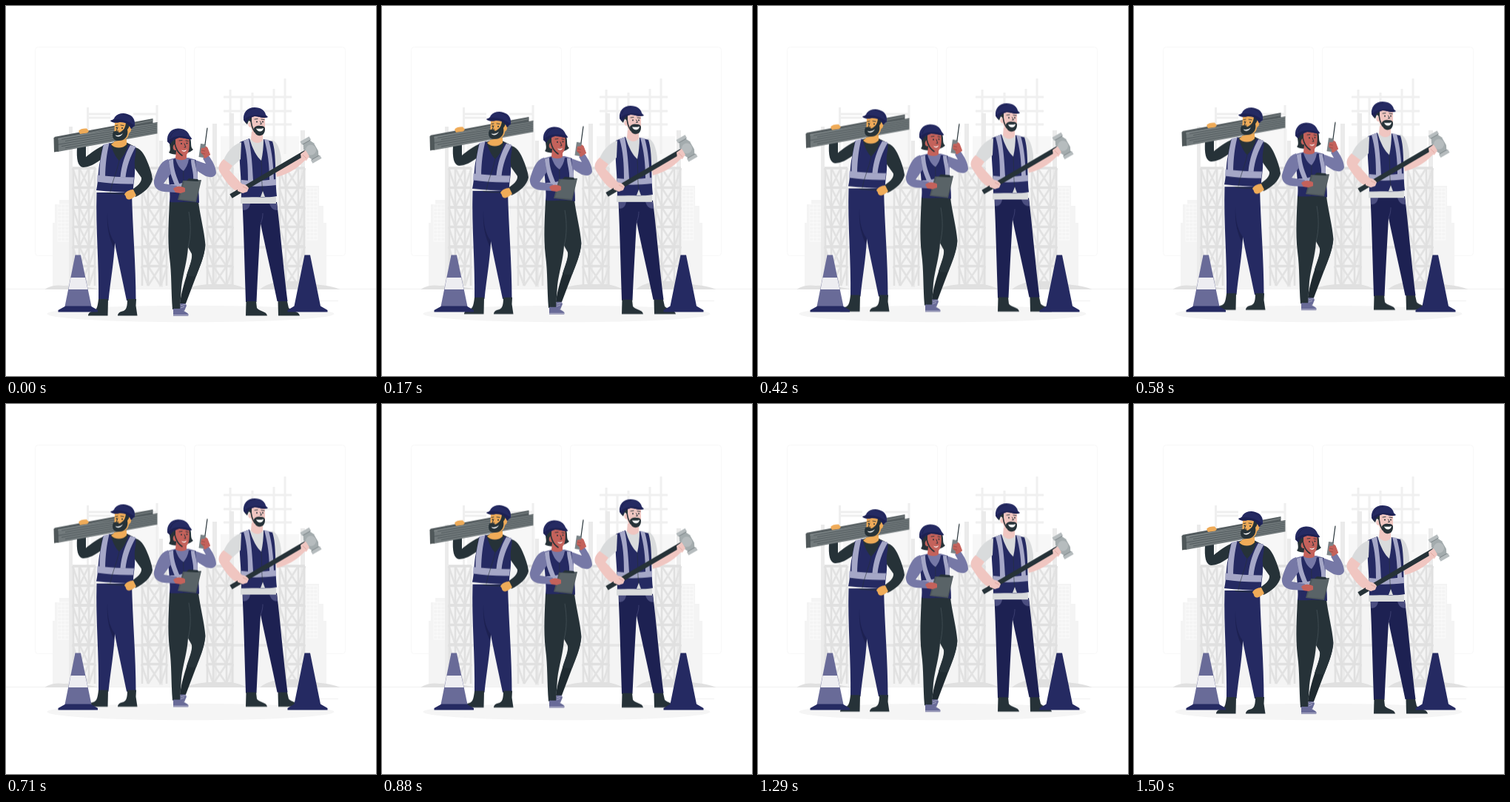
Animation, 500 px wide and 500 px high, one loop 1540 ms. Source, as an HTML page:

```html
<!DOCTYPE html>
<html lang="en">
<head>
<meta charset="utf-8">
<title>Construction crew</title>
<style>
  html, body { margin: 0; width: 100%; height: 100%; overflow: hidden; background: #fff; }
  svg { display: block; width: 100vw; height: 100vh; }
  .navy { fill: #252a62; }
  .deep { fill: #1d2152; }
  .dark { fill: #263238; }
  .tape { fill: #a5a7c7; }
  .mauve { fill: #7678a6; }
  .shoe { fill: #696b98; }
  .tan { fill: #efab58; }
  .brown { fill: #c4625b; }
  .pink { fill: #f0c6c1; }
  .cloth { fill: #d9dbdc; }
  .line { fill: none; stroke: #263238; stroke-linecap: round; stroke-linejoin: round; }
</style>
</head>
<body>
<svg viewBox="0 0 500 500" xmlns="http://www.w3.org/2000/svg">
  <g fill="none" stroke="#f8f8f8">
    <rect x="39.500" y="55.500" width="203" height="282" rx="4"/>
    <rect x="254.500" y="55.500" width="204" height="282" rx="4"/>
  </g>
  <g id="site"></g>
  <path d="M0 382.500H500M417 398.500h32" stroke="#ebebeb" stroke-width=".7"/>
  <g fill="#e0e0e0">
    <path d="M52 383C60 378 69 376.500 78 378C92 377 108 378 126 383Z"/>
    <path d="M240 383C256 377 272 375 288 376C304 374 315 378 326 383Z"/>
    <path d="M343 383C356 372 378 370 398 373C416 377 434 376 452 383Z"/>
  </g>
  <ellipse cx="249.500" cy="416" rx="194" ry="11.300" fill="#f5f5f5"/>

  <g id="crew">
    <!-- carpenter -->
    <g>
      <path class="dark" d="M96 191L108 188V204C114 199 123 192 135 187L131 205C121 214 111 218 104 218C97 217 95 207 96 191Z"/>
      <path class="navy" d="M122.500 252H170C171 300 175.500 350 175.500 398H163C157 368 151 342 147 320C146 346 141 372 138.500 398H125C126 350 121 300 122.500 252Z"/>
      <path class="deep" d="M137 280C137 297 140 310 147 320L146 328C139 313 136 299 137 280Z"/>
      <path class="dark" d="M125 396H138L137.500 418.500H111C111 415 114 413 119 412C123 410 124 405 125 396Z"/>
      <path class="dark" d="M164 396H176L175.500 405L177.500 418.500H151C151 415 154 413 159 412C163 410 164 405 164 396Z"/>
      <path class="dark" d="M168 190C179 190 185 196 190 208C194 217 197 226 198 234C196 244 186 253 175 258L169 249C177 244 184 238 183 232L173 218Z"/>
      <path class="dark" d="M131 189L146 184H162L174 190V215H130Z"/>
      <path class="tan" d="M146 175H163V187C158 193 147 193 142 187L146 184Z"/>
      <path class="navy" d="M131 188L141 185C144 196 149 206 153 209C158 204 163 197 165 187L175 190C177 197 173 205 174 216C175 232 171 243 172 253C155 251 139 251 122 249C125 236 124 222 127 210Z"/>
      <path class="tape" d="M132 187L139.500 185.500C136 200 134.500 213 134 231L126.500 230C126 212 129 199 132 187Z"/>
      <path class="tape" d="M168 188L175.500 190C168 203 163 217 161.500 232L154.500 231C156 215 161 200 168 188Z"/>
      <path class="tape" d="M123.500 228.500C140 230.500 156 231.500 173 231.500L172 240.500C155 241 139 239.500 123 237.500Z"/>
      <path class="line" d="M153 209C150 224 143 238 141 251" stroke-width=".6"/>
      <path class="line" d="M137 252.500C148 254 156 254 163 254" stroke-width="1"/>
      <path class="tan" d="M160 255C161 251 167 248 172 248L176 256C172 259 169 262 165 261.500C161 260 163 257 160 255Z"/>
      <path d="M65 177L198.500 152V160L70 182Z" fill="#555d60"/>
      <path d="M70 178L204.500 157.500V172.500L70 197Z" fill="#727a7c"/>
      <path d="M64.500 178L70 177L71 196.500L65 197.500Z" fill="#50585a"/>
      <path id="grain" fill="none" stroke="#4b5457" stroke-width=".8"/>
      <path d="M70 180L199 154.500" stroke="#8b9294" stroke-width=".8"/>
      <path class="tan" d="M98 169C100 166 105 165 109 165.500L112 169L110 171.500L100 173Z"/>
      <path class="tan" d="M147 155H165V163C170 161 171 169 166 172C165 182 154 184 148 180C145 175 147 166 147 155Z"/>
      <path class="dark" d="M162 156H167L166 164L164 167C166 176 160 183 151 182C144 182 143 175 145 170C148 168 151 169 153 171C158 169 162 165 162 156Z"/>
      <path d="M147.500 174.500C151 175.500 155 174.500 158 172C156 176.500 150 178 147.500 174.500Z" fill="#fff"/>
      <path class="line" d="M148 161.500l3-.5M155 161l4 .5M151 164l-2 5h3" stroke-width=".9"/>
      <circle class="dark" cx="149.500" cy="164.500" r="1"/><circle class="dark" cx="157" cy="165" r="1"/>
      <path class="navy" d="M141 155C144 154 146 153 147 150C151 145 158 144 164 146C171 148 175 153 174 162L169 166C167 160 162 157 154 157C149 158 144 158 141 155Z"/>
      <path class="deep" d="M141 155C152 151 163 154 173 161L169 166C166 159 160 156 153 157C148 158 144 158 141 155Z"/>
      <path d="M158 146C165 147 170 151 172 157" fill="none" stroke="#1d2152"/>
    </g>

    <!-- foreman -->
    <g>
      <path class="dark" d="M221 181C220 188 224 194 220 198C226 203 246 201 253 194C248 190 252 184 248 177Z"/>
      <path class="shoe" d="M236 400L242 400L244 405L241 412L234 411Z"/>
      <path d="M244 318L269 322C269 336 262 352 257 365L243 402L235 402C237 385 243 368 246 358C249 349 252 342 252 335Z" fill="#1f2a30"/>
      <path class="dark" d="M221 264H260C262 282 268 304 269.500 323C268 340 261 354 257 365C251 366 248 365 244 364C248 352 252 342 251 335L246 326C245 345 239 362 237 380L235 410H225C223 385 224 362 221 340C218 314 220 288 221 264Z"/>
      <path d="M247 278C250 295 250 311 246 326" fill="none" stroke="#455157" stroke-width=".8"/>
      <path class="shoe" d="M226 409H237C239 413 245 413 247 417.500L246 418.800H226Z"/>
      <path d="M226 417.500H247" stroke="#d5d6e3" stroke-width=".6"/>
      <path d="M236 405l7-2M236 408l5-2" stroke="#d5d6e3" stroke-width=".6"/>
      <path class="mauve" d="M218 208L229 205H247L257 208L259 222L258 263H222Z"/>
      <path class="brown" d="M230 195H244V206C240 209 234 209 229 206Z"/>
      <path class="mauve" d="M251 207C260 209 266 212 270 213L266 206L273 201C279 209 284 218 284 226C282 232 276 232 270 230C264 227 259 223 255 220Z"/>
      <path class="navy" d="M219 210L229 206C231 214 235 220 240 223C243 219 246 214 247 207L256 208C257 226 261 244 261 266C247 263 235 266 221 265C224 244 217 224 219 210Z"/>
      <path class="tape" d="M220 209L226 207C226 221 231 232 235 242L229 244C224 232 220 222 220 209Z"/>
      <path class="tape" d="M250 207.500L255 208C256 217 259 225 259 235H253C254 225 250 217 250 207.500Z"/>
      <path class="tape" d="M222 241C234 242 247 236 260 234V240C247 243 234 248 223 247Z"/>
      <path class="line" d="M240 223C239 235 242 250 240 264" stroke-width=".6"/>
      <path class="mauve" d="M219 207C208 210 204 222 200 236C199 245 205 250 214 251L229 252L231 243L213 240L223 226Z"/>
      <path d="M239 236L264 235L257 265L232 262Z" fill="#4d575b"/>
      <path d="M241 237L263 237L256 263L234 261Z" fill="#596367"/>
      <path class="dark" d="M244 236L247 233L259 234L260 237Z"/>
      <path class="brown" d="M226 247C230 243 236 243 242 246L242 251L236 253L229 252Z"/>
      <path class="brown" d="M262 194C265 187 271 188 273 193L276 201L269 206L262 202Z"/>
      <path d="M263 186L270 187L267 205L260.500 204Z" fill="#7a8387"/>
      <path class="line" d="M269 187L272 165" stroke-width="1.200"/>
      <path class="brown" d="M264 192L272 191L276 201L270 205L263 198Z"/>
      <path d="M264 195l5 1M264 199l5 1" stroke="#8d4b46" stroke-width=".7"/>
      <path class="brown" d="M229 177H247C248 184 249 196 244 201C239 204 232 200 230 195C225 196 224 188 229 186Z"/>
      <path class="line" d="M227 178C228 188 230 197 238 202" stroke-width="1.600"/>
      <path d="M237 194.500C240 196 242 195.500 244 194C243 197.500 239 197.500 237 194.500Z" fill="#fff"/>
      <path class="line" d="M234 182l4-.5M243 182l3 .5M241 186l2 5h-2" stroke-width=".9"/>
      <circle class="dark" cx="237" cy="186" r="1"/><circle class="dark" cx="244.500" cy="185.500" r="1"/>
      <path class="navy" d="M218 183C217 173 223 166 232 165.500C240 165 246 169 248 175C249 177 251 178 251 180C246 181 241 178 234 178C228 180 223 183 222 187Z"/>
      <path class="deep" d="M218 183C224 176 237 173 251 179C246 181 241 178 234 178C228 179 224 182 222 187Z"/>
      <path d="M222 178C224 171 228 168 234 167" fill="none" stroke="#1d2152"/>
    </g>

    <!-- demolition worker -->
    <g>
      <path class="pink" d="M364 219C373 220 387 209 398 200L408 204C397 217 385 226 366 231Z"/>
      <path class="cloth" d="M359 181C367 183 370 193 372 207L372 218L363 222Z"/>
      <path class="deep" d="M319.500 265H366C371 307 374 345 380.500 399H366.500C359 362 351 328 344 294C342 330 340 365 338.500 400H324C322.500 354 321.500 310 319.500 265Z"/>
      <path d="M347 280C347 287 345 292 344 294" fill="none" stroke="#4b4e80" stroke-width=".7"/>
      <path d="M320 267H330C329 273 326 276 320.500 276ZM356 267H366L367 276C361 276 358 273 356 267Z" fill="#4b4e80"/>
      <path class="dark" d="M324.500 399H338L339 408C342 413 352 412 353 418.500H324Z"/>
      <path class="dark" d="M367.500 399H380L382 408C386 413 396 412 397 418.500H368Z"/>
      <path class="cloth" d="M317 185L331 180H348L361 183L365 267H317Z"/>
      <path class="pink" d="M332 170H347V181C343 187 335 186 331 180Z"/>
      <path class="navy" d="M316 184L329 179C333 193 339 204 345 209C347 200 348 190 348 180L360 183C366 201 363 229 366 257C349 260 334 257 318 259C319 235 314 210 316 184Z"/>
      <path class="tape" d="M321 182L328 179.500C332 200 333 217 334 236L327 236C327 216 326 199 321 182Z"/>
      <path class="tape" d="M349 180L355 181C360 199 361 215 362 235H356C356 215 354 198 349 180Z"/>
      <path class="tape" d="M318 235C333 237 349 236 365 234V242C349 244 334 244 318 243Z"/>
      <path class="line" d="M345 209C346 228 345 243 348 257" stroke-width=".6"/>
      <path d="M344 258L347 250L350 258Z" fill="#d9dbdc"/>
      <path class="cloth" d="M318 258.500C334 260 349 259 365 258.500V267H317Z"/>
      <path class="cloth" d="M318 184C305 188 298 199 294 208L306 217L317 207Z"/>
      <path class="pink" d="M294 207C288 213 285 219 290 226C296 236 304 247 314 252L322 244L302 222L306 216Z"/>
      <path d="M304 257L408 196" stroke="#263238" stroke-width="6.500"/>
      <g transform="translate(412 194.500) rotate(-30)" fill="#a3abad">
        <path d="M-5 -12H5L8 -6V6L5 12H-5L-8 6V-6Z"/>
        <path d="M-7 -17H7V-12H-7ZM-7 12H7V17H-7Z" fill="#b6bcbe"/>
        <path d="M-6 -12H6M-6 12H6" stroke="#7b8487"/>
        <circle r="7" fill="#b6bcbe"/>
      </g>
      <path class="pink" d="M313 242C318 239 325 241 328 246L326 251L320 253L313 250Z"/>
      <path class="pink" d="M398 200L405 195L410 203L406 209L399 207Z"/>
      <path d="M320 244l6 3M401 201l5 5" stroke="#d79c96" stroke-width=".7"/>
      <path class="pink" d="M331 148H350V167C349 175 340 177 334 172L331 164C326 164 326 156 331 156Z"/>
      <path class="dark" d="M322 148L332 150V157L328 155L326 160C322 157 320 153 322 148Z"/>
      <path class="line" d="M331 152C331 160 332 164 336 170" stroke-width="1.600"/>
      <path class="dark" d="M335 165C338 161 341 161.500 344 162C347 161.500 350 163 350 166C350 173 346 176 341 175C337 174 335 170 335 165Z"/>
      <path d="M338 165.500C341 166 345 166 348 165C347 171 340 171 338 165.500Z" fill="#fff"/>
      <path class="line" d="M336 153l4-.5M345 153l4 .5M343.500 156l2 3.500h-2" stroke-width=".9"/>
      <circle class="dark" cx="339" cy="156.500" r="1"/><circle class="dark" cx="347" cy="156.500" r="1"/>
      <path class="navy" d="M321 154C320 144 326 137 336 137C344 137 350 141 351 147L354 150C348 153 342 149 336 149C331 150 327 153 325 158Z"/>
      <path class="deep" d="M321 154C328 147 341 145 354 150C348 153 342 149 336 149C331 150 327 153 325 158Z"/>
      <path d="M324 148C326 142 330 139 337 139" fill="none" stroke="#1d2152"/>
    </g>
  </g>

  <!-- cones -->
  <path d="M93.500 336.500H101L115.500 406H79.500Z" fill="#696b98"/>
  <path d="M87.500 367H107L110.500 383H84.500Z" fill="#ededf1"/>
  <path class="navy" d="M80.500 405.500H114.500L124 411V413.500H70.500V411Z"/>
  <path class="navy" d="M403.500 336.500H411L425 405.500L434.500 411V413.500H380.500V411L389.500 405.500Z"/>
</svg>
<script>
  const $ = id => document.getElementById(id);
  const box = (x, y, w, h, c) => `<rect x="${x}" y="${y}" width="${w}" height="${h}" fill="${c}"/>`;
  const path = (d, c, w) => `<path d="${d}" fill="none" stroke="${c}" stroke-width="${w}"/>`;

  // lattice tower: two posts, crossed braces, six storeys
  function tower(x, w) {
    const top = 219, step = 26.5, in1 = x + 9, in2 = x + w - 9;
    let d = '', rails = '';
    for (let i = 0; i < 6; i++) {
      const y = top + i * step, b = y + step;
      d += `M${in1} ${y}L${in2} ${b}M${in2} ${y}L${in1} ${b}`;
      d += `M${x} ${y}L${in1} ${b}M${in2} ${b}L${x + w} ${y}`;
      rails += `M${x} ${y}h${w}`;
    }
    const posts = [x + 1, in1, in2, x + w - 1].map(p => `M${p} ${top}V378`).join('');
    return path(d, '#e2e2e2', 2.6) + path(rails, '#e0e0e0', 3.5) + path(posts, '#e0e0e0', 2.6);
  }

  // window grid of a distant block
  function panes(x, y, w, h) {
    let d = '';
    for (let i = 0; i <= h; i += 5) d += `M${x} ${y + i}h${w}`;
    for (let i = 0; i <= w; i += 5) d += `M${x + i} ${y}v${h}`;
    return path(d, '#fcfcfc', .8);
  }

  function drawSite() {
    const pale = '#f4f4f4', mid = '#ebebeb', ground = 380;
    let s = box(63, 293, 24, 89, pale) + box(66, 268, 20, 30, pale) + box(72, 262, 16, 10, pale)
      + box(85, 220, 320, 162, pale) + box(404, 270, 25, 112, pale) + box(404, 243, 19, 30, pale)
      + box(427, 293, 6, 89, pale) + box(115, 166, 92, 60, '#f7f7f7') + box(290, 176, 106, 50, '#f7f7f7');
    s += panes(70, 268, 15, 50) + panes(406, 246, 15, 70);
    // roof scaffolds
    s += path('M110.500 137V220M204 134V220M109 146H141M172 146H205M109 151H141', '#efefef', 3);
    s += path('M303 113V220M318 122V200M333 117V200M362 112V190M377 98V200M294 123H386M294 142H386M294 160H386', '#f0f0f0', 3);
    for (const [x, y, w] of [[85, 163, 5], [207, 182, 5], [279, 159, 6], [302, 145, 6], [398, 168, 6]])
      s += box(x, y, w, ground - y, mid);
    s += path('M89 272H404M89 326H404', '#e6e6e6', 3.5);
    for (const [x, w] of [[90, 31], [183, 35], [271, 36], [369, 35]]) s += tower(x, w);
    $('site').innerHTML = s;
  }

  function drawGrain() {
    let d = 'M70 178V197M70 178L204.5 157.5';
    for (let i = 1; i < 6; i++) {
      const y = 178 + i * 3.1, e = 157.5 + i * 2.5;
      d += `M${70 + i % 3 * 5} ${y - i % 3 * .8}C110 ${y - 7} 153 ${e + 9} 204 ${e}`;
    }
    $('grain').setAttribute('d', d);
  }

  drawSite();
  drawGrain();

  // the crew rises and sinks in even steps, then rests briefly
  const LOOP = 1540, at = ms => ms / LOOP, shift = y => `translateY(${y}px)`;
  $('crew').animate([
    { offset: 0, transform: shift(0), easing: 'steps(18)' },
    { offset: at(750), transform: shift(-10), easing: 'steps(18)' },
    { offset: at(1500), transform: shift(0) },
    { offset: 1, transform: shift(0) }
  ], { duration: LOOP, iterations: Infinity, delay: -4 });
</script>
</body>
</html>
```
